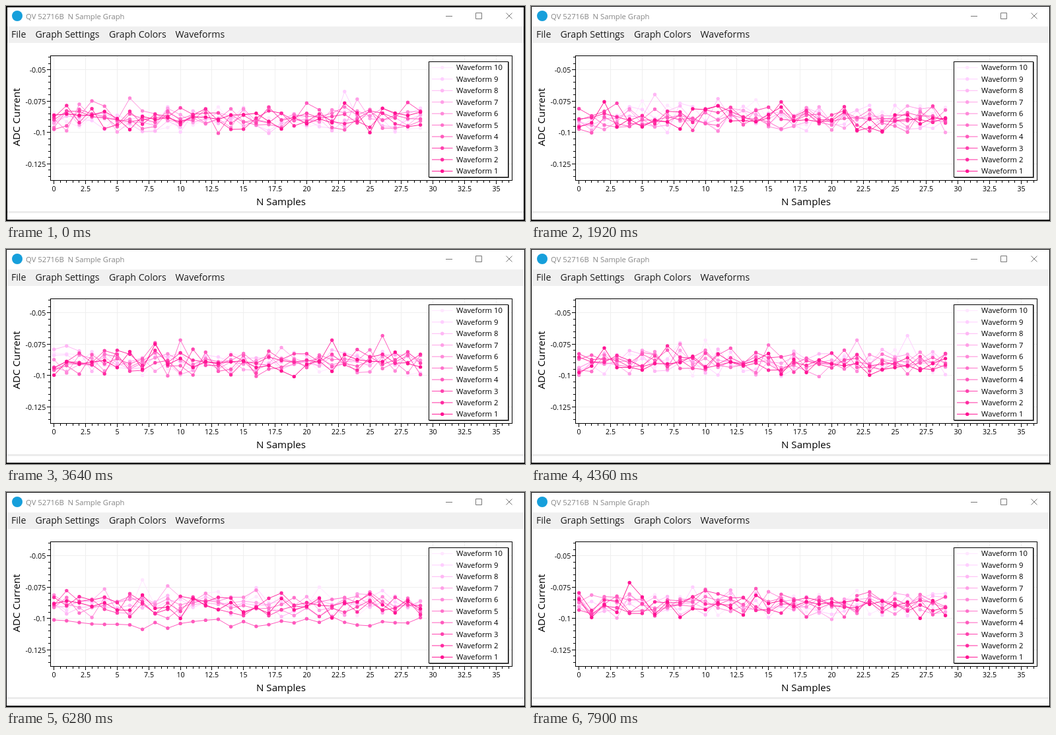
These frames come from a looping animation (786 px wide and 326 px high, 8000 ms). An HTML page:

```html
<!DOCTYPE html>
<html lang="en">
<head>
<meta charset="utf-8">
<title>N Sample Graph</title>
<style>
  html, body { margin: 0; width: 100%; height: 100%; overflow: hidden; background: #fff; }
  svg { display: block; font-family: "Open Sans", "Noto Sans", sans-serif; }
  text { white-space: pre; fill: #000; }
  .title { font-size: 11.25px; fill: #858585; }
  .menu { font-size: 14.15px; fill: #1c1c1c; }
  .tick { font-size: 10.7px; }
  .legend { font-size: 11.25px; }
  .axis { font-size: 15.15px; }
  .mid { text-anchor: middle; }
  .end { text-anchor: end; }
  .dots { stroke-width: 5.4; stroke-linecap: round; }
</style>
</head>
<body>
<svg id="stage" width="786" height="326" viewBox="0 0 786 326" fill="none"></svg>
<script>
const LOOP = 8000, STEPS = 50, WAVES = 10, SAMPLES = 30;
const LOW_SWEEP = 37;
const stage = document.getElementById('stage');

// Sweeps arrive on a 100 ms beat, with a 20 ms slip now and then
const startOf = k => 100 * Math.floor(k * 1.55 + 0.4) + 20 * Math.floor(k / 8.6);

function stepAt(t) {
  let k = 0;
  while (k < STEPS && startOf(k + 1) <= t) k++;
  return k;
}

function randomFrom(seed) {
  return () => {
    seed = seed + 0x6D2B79F5 | 0;
    let t = Math.imul(seed ^ seed >>> 15, 1 | seed);
    t = t + Math.imul(t ^ t >>> 7, 61 | t) ^ t;
    return ((t ^ t >>> 14) >>> 0) / 4294967296;
  };
}

// Noise around a level, capped below, with occasional upward spikes
function sweepPaths(n) {
  const rnd = randomFrom(n * 7919 + 4321);
  const low = n === LOW_SWEEP;
  const level = low ? 199 : 172, spread = low ? 10 : 23, cap = low ? 210 : 194;
  const points = Array.from({ length: SAMPLES }, (_, i) => {
    const noise = (rnd() + rnd() - 1) * spread;
    const spike = rnd() < 0.12 ? rnd() * spread : 0;
    const y = Math.min(cap - rnd() * 4, level + noise - spike);
    return `${(72.7 + i * 19.135).toFixed(1)} ${y.toFixed(1)}`;
  });
  return { line: 'M' + points.join('L'), dots: points.map(p => `M${p}h0`).join('') };
}

const sweeps = {};
for (let n = 1 - WAVES; n <= STEPS; n++) sweeps[n] = sweepPaths(n);

// Age 0 is the newest sweep, in the strongest pink
const pink = age => `rgb(255,${Math.round(20 + 23.3 * age)},${Math.min(255, 147 + 14 * age)})`;
const trace = ({ line, dots }, age) =>
  `<g stroke="${pink(age)}"><path d="${line}"/><path class="dots" d="${dots}"/></g>`;
const text = (x, y, cls, str) => `<text x="${x}" y="${y}" class="${cls}">${str}</text>`;
const box = (x, y, w, h, fill, stroke = 'none') =>
  `<rect x="${x}" y="${y}" width="${w}" height="${h}" fill="${fill}" stroke="${stroke}"/>`;

function windowFrame() {
  return box(0, 0, 786, 326, '#fff') + box(0, 31, 786, 25, '#f0f0f0') + box(0, 311, 786, 3, '#ececec')
    + '<circle cx="17" cy="15" r="8" fill="#169fdb"/>'
    + text(30, 20, 'title', 'QV 52716B  N Sample Graph')
    + '<path d="M666 15.5h10M711.5 10.5h9v9h-9zM757.5 10.5l9 9m0-9l-9 9" stroke="#777"/>'
    + text(8, 48, 'menu', 'File') + text(44.5, 48, 'menu', 'Graph Settings')
    + text(156, 48, 'menu', 'Graph Colors') + text(256.5, 48, 'menu', 'Waveforms');
}

function plotAxes() {
  let grid = '', ticks = '', labels = '';
  for (let i = 0; i <= 72; i++) {
    const x = Math.floor(72.7 + i * 9.5675) + 0.5, major = i % 5 === 0;
    ticks += `M${x} 265v${major ? 5 : 3}`;
    if (!major) continue;
    grid += `M${x} 76v188`;
    labels += text(x, 280.5, 'tick mid', i / 2);
  }
  for (let j = -2; j <= 17; j++) {
    const y = Math.floor(96.5 + j * 9.5) + 0.5, major = j % 5 === 0;
    ticks += `M67 ${y}h${major ? -5 : -3}`;
    if (!major) continue;
    grid += `M68 ${y}h698`;
    labels += text(60.3, y + 4, 'tick end', -(50 + j * 5) / 1000);
  }
  return `<path d="${grid}" stroke="#efefef"/><path d="${ticks}" stroke="#000"/>` + labels
    + box(67.5, 75.5, 699, 189, 'none', '#000')
    + text(416.5, 302, 'axis mid', 'N Samples')
    + '<text class="axis mid" transform="translate(21 168.5) rotate(-90)">ADC Current</text>';
}

function legend() {
  let out = box(641.5, 85.5, 120, 175, '#777', '#777') + box(640.5, 84.5, 120, 175, '#fff', '#000');
  for (let age = 0; age < WAVES; age++) {
    const y = 250.4 - age * 17.45;
    out += trace({ line: `M645 ${y}h31.5`, dots: `M660.7 ${y}h0` }, age)
      + text(682, y + 4, 'legend', `Waveform ${age + 1}`);
  }
  return out;
}

stage.innerHTML = windowFrame() + plotAxes() + '<g id="traces"></g>' + legend()
  + '<path d="M.5 326V.5h785V326" stroke="#000"/>' + box(0, 324, 786, 2, '#000')
  + '<path id="edge" d="M1 325V1h784v324" stroke="#000" stroke-width="2"/>';
const traces = document.getElementById('traces');
const edge = document.getElementById('edge');

let shown = -1;
function draw(t) {
  const step = stepAt(t);
  if (step === shown) return;
  shown = step;
  let out = '';
  for (let age = WAVES - 1; age >= 0; age--) out += trace(sweeps[step - age], age);
  traces.innerHTML = out;
  // The window border is thicker until the first sweep
  edge.style.display = step ? 'none' : '';
}

const origin = performance.now();
function tick() {
  draw((performance.now() - origin) % LOOP);
  requestAnimationFrame(tick);
}
tick();
</script>
</body>
</html>
```
